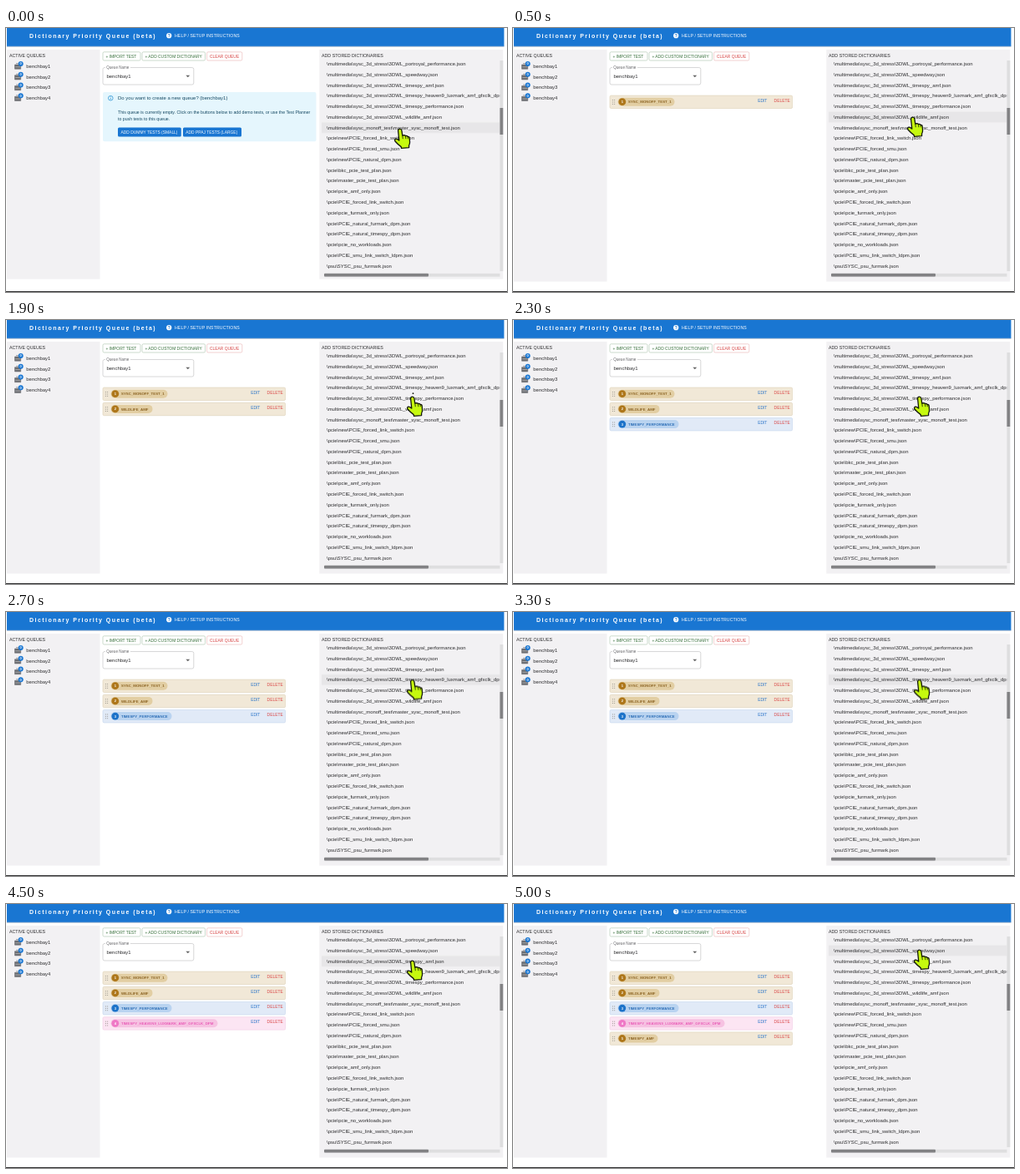
Animation, 600 px wide and 317 px high, one loop 5100 ms. Source, as an HTML page:

```html
<!DOCTYPE html>
<html lang="en">
<head>
<meta charset="utf-8">
<title>Dictionary Priority Queue</title>
<style>
html, body { margin: 0; width: 100%; height: 100%; overflow: hidden; background: #fff; }
svg { display: block; width: 600px; height: 317px; }
text { font-family: "Liberation Sans", Arial, sans-serif; white-space: pre; }
.entry { font-size: 5.94px; fill: #2b2b2d; }
.heading { font-size: 5.3px; fill: #2b2b2d; }
.button { font-size: 4.93px; }
.chip { font-size: 4.36px; font-weight: bold; }
.count { font-size: 4px; font-weight: bold; fill: #fff; text-anchor: middle; }

.loop, .item { animation: 5100ms step-end infinite; }
#empty { animation-name: leave; }
#hover { animation-name: hover; }
#hand { animation-name: travel; }
#tap { animation-name: tap; }
#extra, .item:nth-child(1) { animation-name: add1; }
.item:nth-child(2) { animation-name: add2; }
.item:nth-child(3) { animation-name: add3; }
.item:nth-child(4) { animation-name: add4; }
.item:nth-child(5) { animation-name: add5; }

@keyframes leave { 0% { opacity: 1 } 5.88%, 100% { opacity: 0 } }
@keyframes add1 { 0% { opacity: 0 } 5.88%, 100% { opacity: 1 } }
@keyframes add2 { 0% { opacity: 0 } 31.37%, 100% { opacity: 1 } }
@keyframes add3 { 0% { opacity: 0 } 45.09%, 100% { opacity: 1 } }
@keyframes add4 { 0% { opacity: 0 } 68.62%, 100% { opacity: 1 } }
@keyframes add5 { 0% { opacity: 0 } 90.19%, 100% { opacity: 1 } }

@keyframes hover {
  0% { transform: translateY(76.56px); opacity: 1 }
  5.88% { transform: translateY(63.8px); opacity: 1 }
  21.56% { transform: translateY(51.04px); opacity: 1 }
  35.29% { transform: translateY(51.04px); opacity: 0 }
  47.05% { transform: translateY(38.28px); opacity: 1 }
  72.54% { transform: translateY(25.52px); opacity: 1 }
  94.11%, 100% { transform: translateY(12.76px); opacity: 1 }
}
@keyframes travel {
  0% { transform: translate(472px, 122px) }
  3.92% { transform: translate(472px, 122px); animation-timing-function: steps(2) }
  7.84% { transform: translate(479px, 108px) }
  19.6% { transform: translate(479px, 108px); animation-timing-function: steps(2) }
  23.52% { transform: translate(487px, 93px) }
  45.09% { transform: translate(487px, 93px); animation-timing-function: steps(3) }
  50.98% { transform: translate(487px, 82.5px) }
  70.58% { transform: translate(487px, 82.5px); animation-timing-function: steps(3) }
  76.47% { transform: translate(487px, 69px) }
  90.19% { transform: translate(487px, 69px); animation-timing-function: steps(3) }
  96.07%, 100% { transform: translate(487px, 56px) }
}
@keyframes tap {
  0% { opacity: 0 } 36.27% { opacity: 1 } 39.21% { opacity: 0 }
  80.39% { opacity: 1 } 82.35%, 100% { opacity: 0 }
}
</style>
</head>
<body>
<svg viewBox="0 0 600 317">
  <defs><clipPath id="pane"><rect x="378" y="39" width="213.5" height="253"/></clipPath></defs>

  <rect x="1" y="21" width="595.5" height="2" fill="#b9c9dc"/>
  <rect x="1" width="595.5" height="21.8" fill="#1976d2"/>
  <text x="28" y="11.6" font-size="7" font-weight="bold" letter-spacing="1.46" fill="#fff">Dictionary Priority Queue (beta)</text>
  <circle cx="195.2" cy="9.2" r="3.1" fill="#fff"/>
  <text x="195.2" y="11.1" font-size="5" font-weight="bold" fill="#1976d2" text-anchor="middle">?</text>
  <text x="202" y="11.2" font-size="5.2" letter-spacing=".1" fill="#fff">HELP / SETUP INSTRUCTIONS</text>

  <g fill="#f2f1f3">
    <rect x="1" y="26" width="111.5" height="275.5"/>
    <rect x="375.3" y="26" width="220" height="275.5"/>
    <path id="extra" class="loop" d="M1 301h111.5v3.5H1zM375.3 301h220v3.5h-220z"/>
  </g>
  <text class="heading" x="4" y="35.2">ACTIVE QUEUES</text>
  <g id="queues"></g>

  <g id="toolbar"></g>
  <rect x="116" y="47.5" width="108.8" height="20.5" rx="2" fill="#fff" stroke="#c6c6c8" stroke-width=".7"/>
  <rect x="119" y="46" width="30" height="3" fill="#fff"/>
  <text x="120.3" y="48.8" font-size="4.54" fill="#66666a">Queue Name</text>
  <text class="entry" x="120.5" y="60">benchbay1</text>
  <path d="M215.4 56.8h4.8l-2.4 2.5z" fill="#666"/>

  <g id="empty" class="loop">
    <rect x="116" y="77" width="255.5" height="59.3" rx="2" fill="#e5f6fd"/>
    <circle cx="125.3" cy="84.2" r="2.8" fill="none" stroke="#1688cf" stroke-width=".7"/>
    <path d="M125.3 83.8v2M125.3 82.3v.8" stroke="#1688cf" stroke-width=".7"/>
    <g fill="#164a63">
      <text x="134" y="86.2" font-size="5.94">Do you want to create a new queue? (benchbay1)</text>
      <g font-size="5.21">
        <text x="134" y="103.3">This queue is currently empty. Click on the buttons below to add demo tests, or use the Test Planner</text>
        <text x="134" y="110.8">to push tests to this queue.</text>
      </g>
    </g>
    <rect x="134" y="119.6" width="75.8" height="11" rx="1.5" fill="#1976d2"/>
    <rect x="212" y="119.6" width="70" height="11" rx="1.5" fill="#1976d2"/>
    <text class="button" x="137.5" y="126.9" fill="#fff">ADD DUMMY TESTS (SMALL)</text>
    <text class="button" x="215.3" y="126.9" fill="#fff">ADD PPAJ TESTS (LARGE)</text>
  </g>
  <g id="items"></g>

  <text class="heading" x="378" y="35.2">ADD STORED DICTIONARIES</text>
  <rect id="hover" class="loop" x="378" y="36.7" width="213.5" height="12.76" fill="#e7e6e8"/>
  <g id="files" clip-path="url(#pane)"></g>
  <g fill="#dededf">
    <rect x="591.5" y="39" width="3.8" height="253"/>
    <rect x="381" y="294.8" width="210.5" height="3.8"/>
  </g>
  <g fill="#828284">
    <rect x="591.5" y="96" width="3.8" height="32"/>
    <rect x="381" y="294.8" width="125" height="3.8" rx="1"/>
  </g>

  <rect y="316" width="600" height="1" fill="#2e2e30"/>

  <g id="hand" class="loop" stroke="#14170a" stroke-linejoin="round">
    <circle id="tap" class="loop" cx=".5" cy="-4.8" r=".9" fill="#14170a" stroke="none"/>
    <path fill="#c6f90f" stroke-width="1.3"
      d="M-2.4 1.2Q-2.4-.8-.4-.8Q1.6-.8 1.9 1.2L2.8 7L4.5 6.6Q6 6.6 6.4 7.6Q8.2 7 9 8.4Q10.8 8 11.2 10L11.6 15Q11.6 17.5 10.6 19V21.6L1.5 22.4L1.2 20.6Q-2.5 18-6 14Q-7 12-5.4 11.2Q-3.6 10.8-1.2 13Z"/>
    <path fill="none" stroke-width=".8" d="M2.8 7l.5 4.2M6.4 7.6l.5 3.6M9 8.4l.4 2.8"/>
  </g>
</svg>
<script>
const fill = (id, list, draw) => {
  document.getElementById(id).innerHTML = list.map(draw).join("");
};

fill("queues", [1, 2, 3, 4], (n, i) => `
  <g transform="translate(0 ${45.8 + 12.75 * i})">
    <path d="M10.5-1.8h7.2v5.2h-7.2zM12-3.2h4.5" fill="#6c6e72" stroke="#6c6e72" stroke-width=".6"/>
    <path d="M11.3 1h5.6" stroke="#dcdce0" stroke-width=".5"/>
    <circle cx="17.7" cy="-2.9" r="3" fill="#1976d2"/>
    <text class="count" x="17.7" y="-1.5">0</text>
    <text class="entry" x="24.3" y="2.1">benchbay${n}</text>
  </g>`);

fill("toolbar", [
  ["+ IMPORT TEST", 116, 45, "#356f39", "#a9c3ab"],
  ["+ ADD CUSTOM DICTIONARY", 163, 75.5, "#356f39", "#a9c3ab"],
  ["CLEAR QUEUE", 240.6, 42.2, "#d64040", "#e7b3b3"]
], ([label, x, width, ink, edge]) => `
  <rect x="${x}" y="28.8" width="${width}" height="10.2" rx="1.5" fill="#fff" stroke="${edge}" stroke-width=".6"/>
  <text class="button" x="${x + 3.4}" y="35.6" fill="${ink}">${label}</text>`);

// Colours: card, edge, pill, badge, ink
const amber = ["#f1e8d7", "#e0d4bc", "#e2ce a3".replace(" ", ""), "#ae771b", "#8c6424"];
const blue = ["#e1eaf7", "#c9d9ee", "#b9d3f0", "#1d73c9", "#2c6eb6"];
const pink = ["#fce5f3", "#f3cfe5", "#f6c2e2", "#ef78c6", "#e95fb8"];

fill("items", [
  ["SYSC_MONOFF_TEST_1", 68, amber],
  ["WILDLIFE_AMF", 50, amber],
  ["TIMESPY_PERFORMANCE", 73, blue],
  ["TIMESPY_HEAVEN9_LUXMARK_AMF_GFXCLK_DPM", 128, pink],
  ["TIMESPY_AMF", 48, amber]
], ([label, width, [card, edge, pill, badge, ink]], i) => `
  <g class="item"><g transform="translate(0 ${88.7 + 18.2 * i})">
    <rect x="116" y="-7.6" width="218.6" height="15.4" rx="1.5" fill="${card}" stroke="${edge}" stroke-width=".7"/>
    <path d="M119.4-2.6v6M121.6-2.6v6" stroke="#8b8780" stroke-width=".9" stroke-dasharray=".9 1.5"/>
    <rect x="125.5" y="-5" width="${width}" height="10" rx="5" fill="${pill}"/>
    <circle cx="130.8" r="4.4" fill="${badge}"/>
    <text class="count" x="130.8" y="1.4">${i + 1}</text>
    <text class="chip" x="138" y="1.6" fill="${ink}">${label}</text>
    <text class="button" x="293.2" y="-.2" fill="#2a74c8">EDIT</text>
    <text class="button" x="312.6" y="-.2" fill="#d94747">DELETE</text>
  </g></g>`);

const stress = ["portroyal_performance", "speedway", "timespy_amf",
  "timespy_heaven9_luxmark_amf_gfxclk_dpm", "timespy_performance", "wildlife_amf"]
  .map(name => "/multimedia/sysc_3d_stress/3DWL_" + name);
const pcie = ["new/PCIE_forced_link_switch", "new/PCIE_forced_smu", "new/PCIE_natural_dpm",
  "bkc_pcie_test_plan", "master_pcie_test_plan", "pcie_amf_only", "PCIE_forced_link_switch",
  "pcie_furmark_only", "PCIE_natural_furmark_dpm", "PCIE_natural_timespy_dpm",
  "pcie_no_workloads", "PCIE_smu_link_switch_ldpm"]
  .map(name => "/pcie/" + name);

fill("files", [...stress, "/multimedia/sysc_monoff_test/master_sysc_monoff_test", ...pcie, "/psu/SYSC_psu_furmark"],
  (path, i) => `<text class="entry" x="384" y="${45.1 + 12.76 * i}">${path.replaceAll("/", "\\")}.json</text>`);
</script>
</body>
</html>
```
